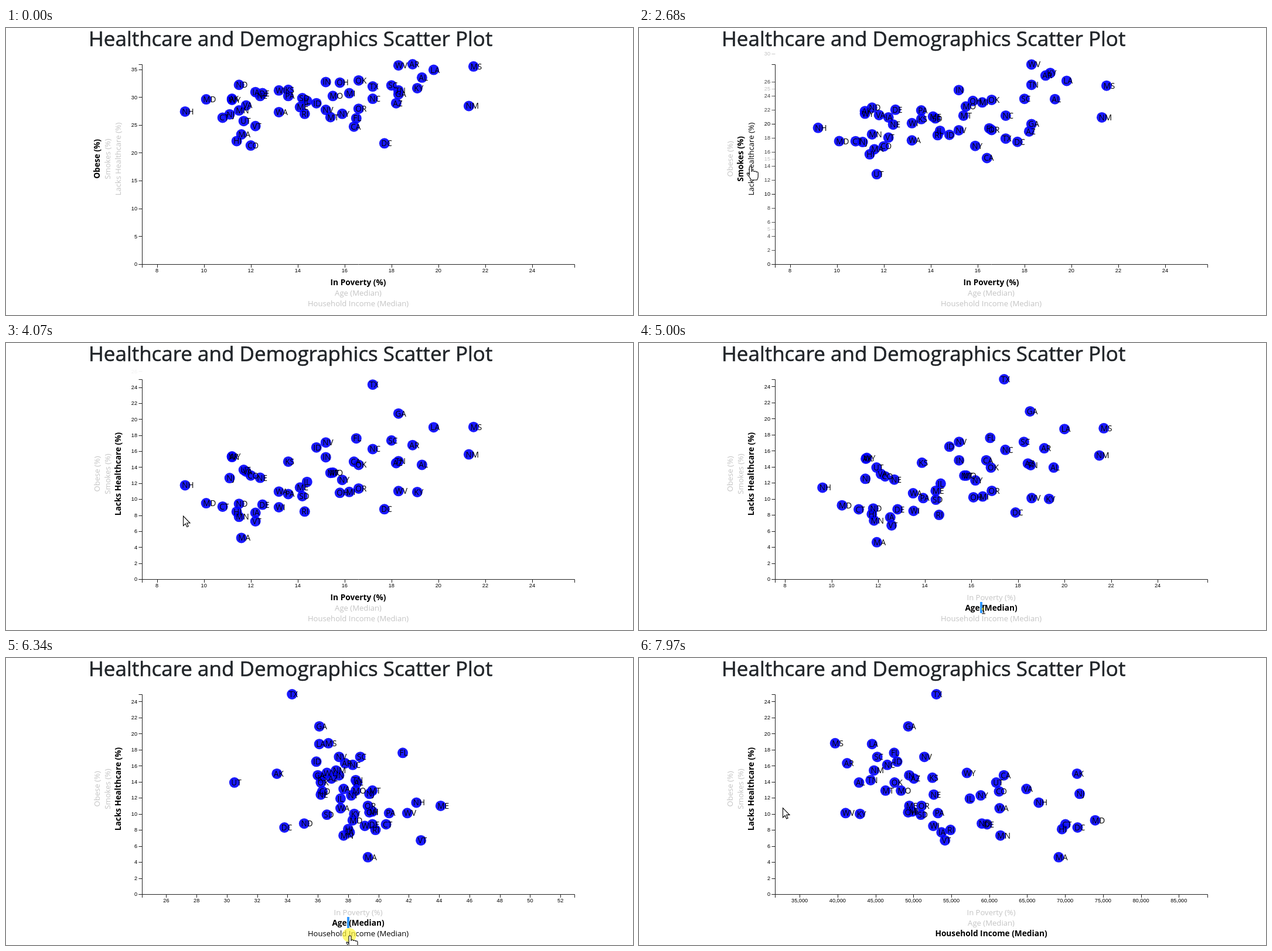
An HTML page with a canvas for the animation above (8 s loop, 1070 px wide and 491 px high).

```html
<!DOCTYPE html>
<html lang="en">
<head>
<meta charset="utf-8">
<title>Scatter Plot</title>
<style>
  html, body { margin: 0; width: 100%; height: 100%; overflow: hidden; background: #fff; }
  canvas { display: block; }
</style>
</head>
<body>
<canvas id="stage" width="1070" height="491"></canvas>
<script>
const ctx = document.getElementById('stage').getContext('2d');
const LOOP = 8000, MOVE = 950;
const LEFT = 232, RIGHT = 970, TOP = 62, BOTTOM = 404;
const SANS = '"Open Sans", sans-serif';

const states = ('AL AK AZ AR CA CO CT DE DC FL GA HI ID IL IN IA KS KY LA ME MD MA MI MN MS MO ' +
  'MT NE NV NH NJ NM NY NC ND OH OK OR PA RI SC SD TN TX UT VT VA WA WV WI WY').split(' ');
const poverty = [19.3, 11.2, 18.2, 18.9, 16.4, 12, 10.8, 12.5, 17.7, 16.5, 18.3, 11.4, 14.8, 14.4, 15.2, 12.2, 13.6,
  19.1, 19.8, 14.1, 10.1, 11.6, 16.2, 11.5, 21.5, 15.5, 15.4, 12.4, 15.2, 9.2, 11.1, 21.3, 15.9, 17.2,
  11.5, 15.8, 16.6, 16.6, 13.6, 14.3, 18, 14.2, 18.3, 17.2, 11.7, 12.2, 11.8, 13.2, 18.3, 13.2, 11.2];
const age = [38.6, 33.3, 36.9, 37.8, 36, 36.3, 40.5, 39.6, 33.8, 41.6, 36.1, 38, 35.9, 37.5, 37.4, 38.1, 36.2,
  38.4, 36.1, 44.1, 38.3, 39.3, 39.6, 37.7, 36.7, 38.5, 39.6, 36.2, 37.4, 42.5, 39.4, 37.2, 38.2, 38.3,
  35.1, 39.4, 36.2, 39.3, 40.7, 39.8, 38.8, 36.6, 38.5, 34.3, 30.5, 42.8, 37.7, 37.5, 41.9, 39.1, 36.6];
const income = [42830, 71583, 50068, 41262, 61933, 61303, 70048, 59716, 71648, 47463, 49321, 69592, 47861, 57444,
  49446, 53712, 52504, 42958, 44555, 49462, 73971, 69160, 49847, 61481, 39680, 48363, 46328, 52686, 51450,
  66532, 71919, 44803, 58878, 46556, 59029, 49308, 47529, 51075, 53234, 54891, 45238, 50979, 44361, 53035,
  60922, 54166, 64902, 61366, 41059, 52622, 57055];
const obesity = [33.5, 29.7, 28.9, 35.9, 24.7, 21.3, 26.3, 30.7, 21.7, 26.2, 30.5, 22.1, 28.9, 29.3, 32.7, 30.9, 31.3,
  31.6, 34.9, 28.2, 29.6, 23.3, 30.7, 27.6, 35.5, 30.2, 26.4, 30.2, 27.7, 27.4, 26.9, 28.4, 27, 29.7,
  32.2, 32.6, 33, 27.9, 30.2, 27, 32.1, 29.8, 31.2, 31.9, 25.7, 24.8, 28.5, 27.3, 35.7, 31.2, 29.5];
const smokes = [21.1, 19.9, 16.5, 24.7, 12.8, 15.7, 15.4, 19.9, 16.4, 17.7, 17.4, 14.1, 15.9, 16.5, 22.9, 18.5, 18.1,
  26.2, 24, 19.3, 14.6, 14.7, 21.2, 16.3, 23, 20.6, 19.9, 17.4, 17, 17.5, 15.1, 19.1, 14.4, 19.1,
  19.9, 21, 21.1, 17, 19.9, 16.3, 21.5, 18.6, 24.2, 14.5, 9.7, 16.4, 19.5, 15.3, 26.7, 17.4, 19.5];
const uninsured = [13.9, 15, 14.4, 16.3, 14.8, 12.8, 8.7, 8.7, 8.3, 17.6, 20.9, 8.1, 16.5, 11.9, 14.8, 7.7, 14.5,
  10, 18.7, 11, 9.2, 4.6, 10.3, 7.3, 18.8, 12.9, 12.9, 12.4, 17.1, 11.4, 12.5, 15.4, 12.3, 16.1,
  8.8, 10.2, 13.9, 11, 10.1, 8, 17.1, 9.9, 14.2, 24.9, 13.9, 6.7, 13.1, 10.7, 10.1, 8.5, 15.1];

const clamp = v => Math.max(0, Math.min(1, v));
const lerp = (a, b, p) => a + (b - a) * p;
const cubicInOut = t => t < .5 ? 4 * t ** 3 : 1 - 4 * (1 - t) ** 3;

function measure(label, values, step, vertical, pos, start) {
  const lo = vertical ? 0 : Math.min(...values) * .8;
  const hi = Math.max(...values) * (vertical ? 1 : 1.2);
  const scale = v => vertical
    ? lerp(BOTTOM, TOP, (v - lo) / (hi - lo))
    : lerp(LEFT, RIGHT, (v - lo) / (hi - lo));
  const ticks = [];
  for (let v = Math.ceil(lo / step) * step; v <= hi; v += step) ticks.push(v);
  return { label, values, scale, ticks, vertical, pos, start };
}

// Each measure becomes active at its start time.
const xMeasures = [
  measure('In Poverty (%)', poverty, 2, false, 435, -LOOP),
  measure('Age (Median)', age, 2, false, 453, 4840),
  measure('Household Income (Median)', income, 5000, false, 471, 6369)
];
const yMeasures = [
  measure('Obese (%)', obesity, 5, true, 155, -LOOP),
  measure('Smokes (%)', smokes, 2, true, 173, 2110),
  measure('Lacks Healthcare (%)', uninsured, 2, true, 191, 3353)
];

function transition(list, t) {
  const i = list.filter(m => m.start <= t).length - 1;
  const to = list[i], from = list[Math.max(0, i - 1)];
  return { from, to, p: cubicInOut(clamp((t - to.start) / MOVE)) };
}
const position = ({ from, to, p }, i) =>
  lerp(from.scale(from.values[i]), to.scale(to.values[i]), p);

// The picture is refreshed in bursts: first time, last time, number of refreshes.
const bursts = [[70, 820, 11], [900, 1510, 9], [2010, 2760, 11], [2840, 3070, 4], [3310, 4070, 11],
  [4150, 4930, 11], [5000, 5790, 11], [5890, 5890, 1], [6340, 7120, 11], [7200, 7350, 3], [7500, 7970, 7]];
function heldTime(t) {
  let held = 0;
  for (const [a, b, n] of bursts) if (t >= a) {
    const gap = n > 1 ? (b - a) / (n - 1) : 1;
    held = a + gap * Math.min(n - 1, Math.floor((t - a) / gap + .1));
  }
  return held;
}

// Pointer path: time, x, y
const path = [[70, 979, 479], [820, 306, 284], [1510, 174, 237], [2300, 174, 237], [2740, 191, 237],
  [3400, 191, 237], [3610, 226, 246], [3850, 242, 262], [4680, 588, 456], [5150, 588, 456],
  [5500, 586, 468], [5900, 586, 468], [6200, 587, 475], [7430, 587, 475], [7970, 245, 256]];
function pointerAt(t) {
  const i = path.findIndex(k => k[0] > t);
  if (i < 0) return path[path.length - 1].slice(1);
  const [t0, x0, y0] = path[Math.max(0, i - 1)], [t1, x1, y1] = path[i];
  const u = clamp((t - t0) / (t1 - t0 || 1)), p = u * u * (3 - 2 * u);
  return [lerp(x0, x1, p), lerp(y0, y1, p)];
}

function text(str, x, y, font, color, align = 'left') {
  ctx.font = font;
  ctx.fillStyle = color;
  ctx.textAlign = align;
  ctx.fillText(str, x, y);
}
function line(...points) {
  ctx.beginPath();
  points.forEach(([x, y]) => ctx.lineTo(x, y));
  ctx.stroke();
}
function disc(x, y, r, color) {
  ctx.fillStyle = color;
  ctx.beginPath();
  ctx.arc(x, y, r, 0, 2 * Math.PI);
  ctx.fill();
}

function drawAxis({ from, to, p }) {
  ctx.strokeStyle = '#222';
  ctx.lineWidth = 1;
  const L = LEFT + .5, R = RIGHT + .5, T = TOP + .5, B = BOTTOM + .5;
  if (to.vertical) line([L - 6, T], [L, T], [L, B], [L - 6, B]);
  else line([L, B + 5.5], [L, B], [R, B], [R, B + 5.5]);
  for (const v of new Set([...from.ticks, ...to.ticks])) {
    const at = lerp(from.scale(v), to.scale(v), p);
    const c = Math.round(at) + .5;
    ctx.globalAlpha = !to.ticks.includes(v) ? 1 - p : from.ticks.includes(v) ? 1 : p;
    const font = '9.2px "Liberation Sans", Arial, sans-serif';
    const label = v.toLocaleString('en-US');
    if (to.vertical) {
      line([L - 6, c], [L, c]);
      text(label, 224, at + 3.3, font, '#000', 'right');
    } else {
      line([c, B], [c, B + 5.5]);
      text(label, at, 418, font, '#000', 'center');
    }
  }
  ctx.globalAlpha = 1;
}

function isOver(m, [x, y]) {
  const [across, along] = m.vertical ? [x - m.pos, y - 224] : [y - m.pos, x - 601];
  ctx.font = '13.1px ' + SANS;
  return Math.abs(across) < 9 && Math.abs(along) < ctx.measureText(m.label).width / 2;
}

function drawLabel(m, active, hovered) {
  ctx.save();
  if (m.vertical) {
    ctx.translate(m.pos + 5, 224);
    ctx.rotate(-Math.PI / 2);
  } else ctx.translate(601, m.pos + 5);
  text(m.label, 0, 0, (active ? 'bold 13.7px ' : '13.1px ') + SANS,
    active || hovered ? '#000' : '#c4c4c4', 'center');
  ctx.restore();
}

const cursors = {
  arrow: new Path2D('M.5 .5V17L4.2 13.5L6.8 19L9.2 18L6.7 12.4H12Z'),
  hand: new Path2D('M-2 2Q-2 0 0 0T2 2V9Q2 7 4 7T6 9Q6 8 8 8T10 10Q10 9 11.5 9T13 11V17' +
    'Q13 20 11 23H1Q0 20-5 14Q-7 11-5 11T-2 14Z'),
  beam: new Path2D('M-3-7H3M0-7V7M-3 7H3')
};
function drawCursor(kind, [x, y]) {
  ctx.save();
  ctx.translate(x, y);
  ctx.fillStyle = '#fff';
  ctx.strokeStyle = '#000';
  ctx.lineWidth = 1.1;
  if (kind !== 'beam') ctx.fill(cursors[kind]);
  ctx.stroke(cursors[kind]);
  ctx.restore();
}

function draw(t) {
  const xs = transition(xMeasures, t), ys = transition(yMeasures, t);
  const pointer = pointerAt(t), shown = t >= 70;
  ctx.fillStyle = '#fff';
  ctx.fillRect(0, 0, 1070, 491);

  const title = 'Healthcare and Demographics Scatter Plot';
  text(title, 141, 31, '35px ' + SANS, '#212529');
  ctx.strokeStyle = '#212529';
  ctx.lineWidth = .6;
  ctx.strokeText(title, 141, 31);

  ctx.save();
  ctx.beginPath();
  ctx.rect(142, 0, 858, 491);
  ctx.clip();
  drawAxis(xs);
  drawAxis(ys);
  const dots = states.map((name, i) => ({ name, x: position(xs, i), y: position(ys, i) }));
  dots.forEach(d => disc(d.x, d.y, 9, 'rgba(0,0,255,.9)'));
  dots.forEach(d => text(d.name, d.x - 5.5, d.y + 5, '13.6px ' + SANS, '#000'));
  ctx.restore();

  if (t >= 4840 && t < 6369) {
    ctx.fillStyle = '#3399ff';
    ctx.fillRect(582, 443, 4, 19);
  }
  let cursor = 'arrow';
  for (const m of [...xMeasures, ...yMeasures]) {
    const active = m === xs.to || m === ys.to, hovered = shown && isOver(m, pointer);
    if (hovered) cursor = active ? 'beam' : 'hand';
    drawLabel(m, active, hovered);
  }

  // A yellow spot marks each press and then shrinks away.
  for (const { start } of [...xMeasures, ...yMeasures]) {
    const since = t - start + 100;
    if (since >= 0 && since < 300) {
      disc(pointer[0] - 1, pointer[1] - 1, 12 * clamp((300 - since) / 200), 'rgba(255,245,60,.7)');
    }
  }
  if (shown) drawCursor(cursor, pointer);
}

const began = performance.now();
function frame() {
  draw(heldTime((performance.now() - began) % LOOP));
  requestAnimationFrame(frame);
}
frame();
</script>
</body>
</html>
```
